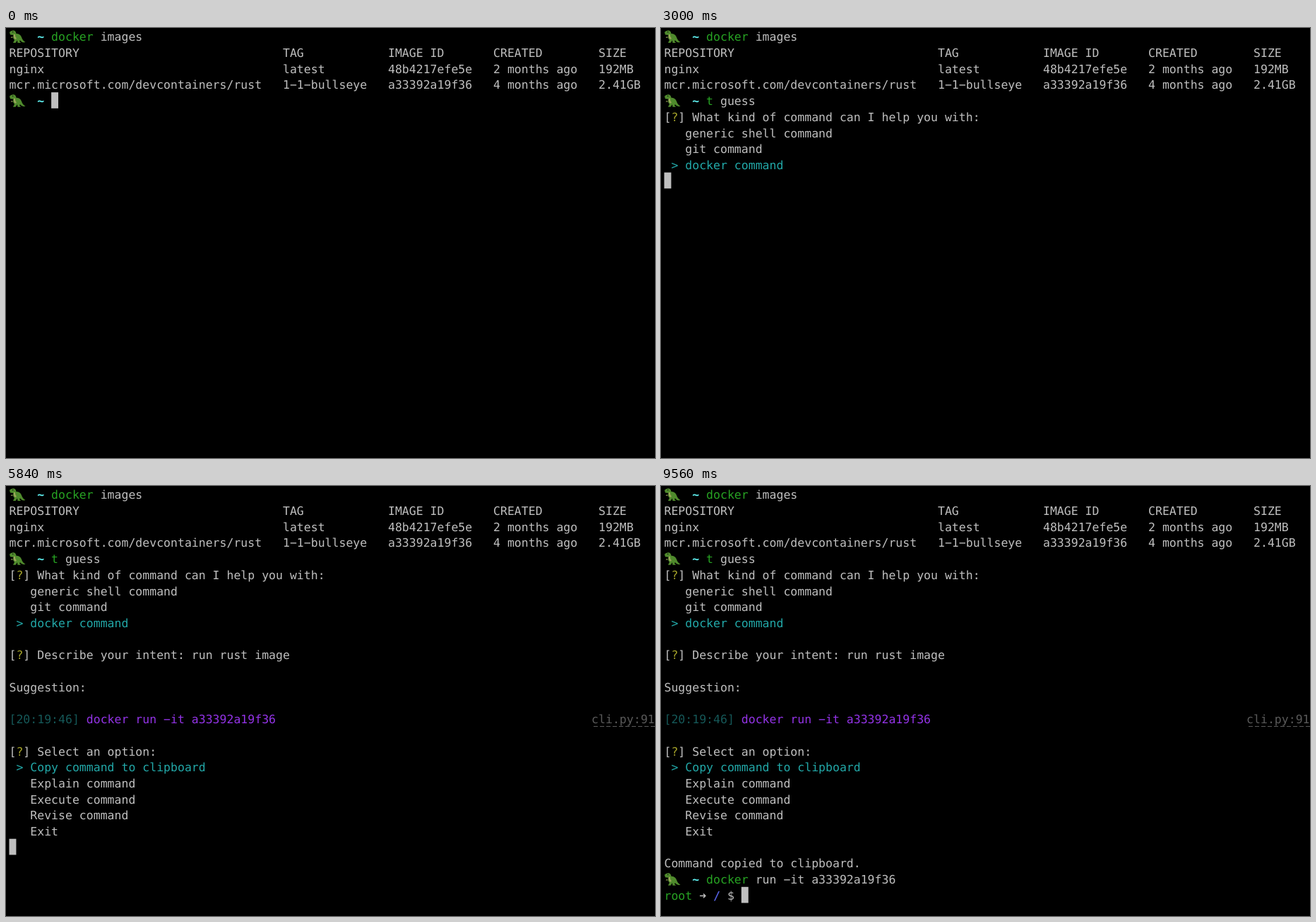
Recreate the animation shown at these times as an HTML page with a canvas. Size 919 by 609 pixels, loop 9920 ms.

```html
<!DOCTYPE html>
<html lang="en">
<head>
<meta charset="utf-8">
<title>Terminal session</title>
<style>
  html, body { margin: 0; width: 100%; height: 100%; overflow: hidden; background: #000; }
  canvas { display: block; }
</style>
</head>
<body>
<canvas id="screen" width="919" height="609"></canvas>
<script>
const ctx = document.getElementById('screen').getContext('2d');
const LOOP = 9920, LEFT = 4.5, CELL = 9.935, LINE = 22.7;
const GRAY = '#bfbfbf', GREEN = '#27a323', CYAN = '#22a8a8', YELLOW = '#a5a32a',
      GHOST = '#555', PURPLE = '#9333e6', DIM = '#5a5a5a';

const GUESS = 't guess';
const GUESS_KEYS = [40, 280, 440, 600, 720, 920, 1040];
const INTENT = 'run rust image';
const INTENT_KEYS = [3840, 4520, 4600, 4680, 4760, 4840, 4880, 4960, 5040, 5120, 5200, 5240, 5320, 5360];
const KINDS = ['generic shell command', 'git command', 'docker command'];
const ACTIONS = ['Copy command to clipboard', 'Explain command', 'Execute command', 'Revise command', 'Exit'];

const dinoBody = new Path2D('M5 6Q7 3 11 3.5Q14 4 14.5 8Q20 8 22 13Q23.5 18 27.5 20Q23 21.5 20 17.5L19 18.5L21 21H16.5L16 17.5L13.5 21H10L12 17Q9 14 10.5 10L6 9.5Z');
const dinoBelly = new Path2D('M11 9Q10 14 13 16L15 15Q12.5 12 13 9ZM9 12L6.5 13.5L9.5 14Z');

// Every glyph sits on the character grid; dashes are drawn full width.
function put(row, col, text, color = GRAY, weight = 'normal') {
  ctx.font = `${weight} 16.5px "DejaVu Sans Mono", monospace`;
  ctx.textRendering = 'geometricPrecision';
  ctx.fillStyle = color;
  [...text.replaceAll('-', '\u2212')].forEach((glyph, i) =>
    ctx.fillText(glyph, LEFT + (col + i) * CELL, row * LINE + 18.3));
}

function cursor(row, col) {
  ctx.fillStyle = GRAY;
  ctx.fillRect(LEFT + col * CELL, row * LINE + 0.3, CELL, LINE);
}

function prompt(row) {
  ctx.save();
  ctx.translate(0, row * LINE);
  ctx.fillStyle = '#4f8a2c';
  ctx.fill(dinoBody);
  ctx.fillStyle = '#9aa65a';
  ctx.fill(dinoBelly);
  ctx.fillStyle = '#111';
  ctx.fillRect(9, 5, 1.3, 1.3);
  ctx.restore();
  put(row, 4, '~', '#5ff0f0', 'bold');
}

function command(row, text) {
  const name = text.split(' ')[0];
  put(row, 6, name, GREEN);
  put(row, 6 + name.length, text.slice(name.length));
}

function question(row, text) {
  put(row, 0, '[ ] ' + text);
  put(row, 1, '?', YELLOW);
}

function menu(row, items, selected) {
  items.forEach((item, i) => {
    const active = i === selected;
    if (active) put(row + i, 1, '>', CYAN);
    put(row + i, 3, item, active ? CYAN : GRAY);
  });
}

function tableRow(row, cells) {
  [0, 39, 54, 69, 84].forEach((col, i) => put(row, col, cells[i]));
}

function suggestion() {
  put(12, 0, 'Suggestion:');
  put(14, 0, '[20:19:46]', '#155858');
  put(14, 11, 'docker run -it a33392a19f36', PURPLE);
  put(14, 83, 'cli.py:91', DIM);
  ctx.strokeStyle = DIM;
  ctx.setLineDash([6, 3]);
  ctx.beginPath();
  ctx.moveTo(832, 340.5);
  ctx.lineTo(919, 340.5);
  ctx.stroke();
}

function draw(t) {
  const typed = keys => keys.filter(k => t >= k).length;
  let caret;

  ctx.fillStyle = '#000';
  ctx.fillRect(0, 0, 919, 609);
  prompt(0);
  command(0, 'docker images');
  tableRow(1, ['REPOSITORY', 'TAG', 'IMAGE ID', 'CREATED', 'SIZE']);
  tableRow(2, ['nginx', 'latest', '48b4217efe5e', '2 months ago', '192MB']);
  tableRow(3, ['mcr.microsoft.com/devcontainers/rust', '1-1-bullseye', 'a33392a19f36', '4 months ago', '2.41GB']);

  prompt(4);
  const n = typed(GUESS_KEYS);
  command(4, GUESS.slice(0, n));
  if (t >= 120) put(4, 6 + n, GUESS.slice(n), GHOST);
  caret = [4, 6 + n];

  if (t >= 1160) caret = [5, 0];
  if (t >= 1840) {
    question(5, 'What kind of command can I help you with:');
    menu(6, KINDS, t < 2800 ? 0 : t < 3000 ? 1 : 2);
    caret = [9, 0];
  }
  if (t >= 3520) {
    const intent = INTENT.slice(0, typed(INTENT_KEYS));
    question(10, 'Describe your intent: ' + intent);
    caret = [10, 26 + intent.length];
  }
  if (t >= 5520) caret = [11, 0];
  if (t >= 5680) {
    suggestion();
    caret = [15, 0];
  }
  if (t >= 5720) {
    question(16, 'Select an option:');
    menu(17, ACTIONS, 0);
    caret = [22, 0];
  }
  if (t >= 6600) {
    put(23, 0, 'Command copied to clipboard.');
    caret = [24, 0];
  }
  if (t >= 7480) {
    prompt(24);
    caret = [24, 6];
  }
  if (t >= 7800) {
    command(24, 'docker run -it a33392a19f36');
    caret = [24, 33];
  }
  if (t >= 9360) caret = [25, 0];
  if (t >= 9560) {
    put(25, 0, 'root', GREEN);
    put(25, 5, '➜');
    put(25, 7, '/', '#5560e0', 'bold');
    put(25, 9, '$');
    caret = [25, 11];
  }
  cursor(...caret);
}

const start = performance.now();
function tick() {
  draw((performance.now() - start) % LOOP);
  requestAnimationFrame(tick);
}
tick();
</script>
</body>
</html>
```
